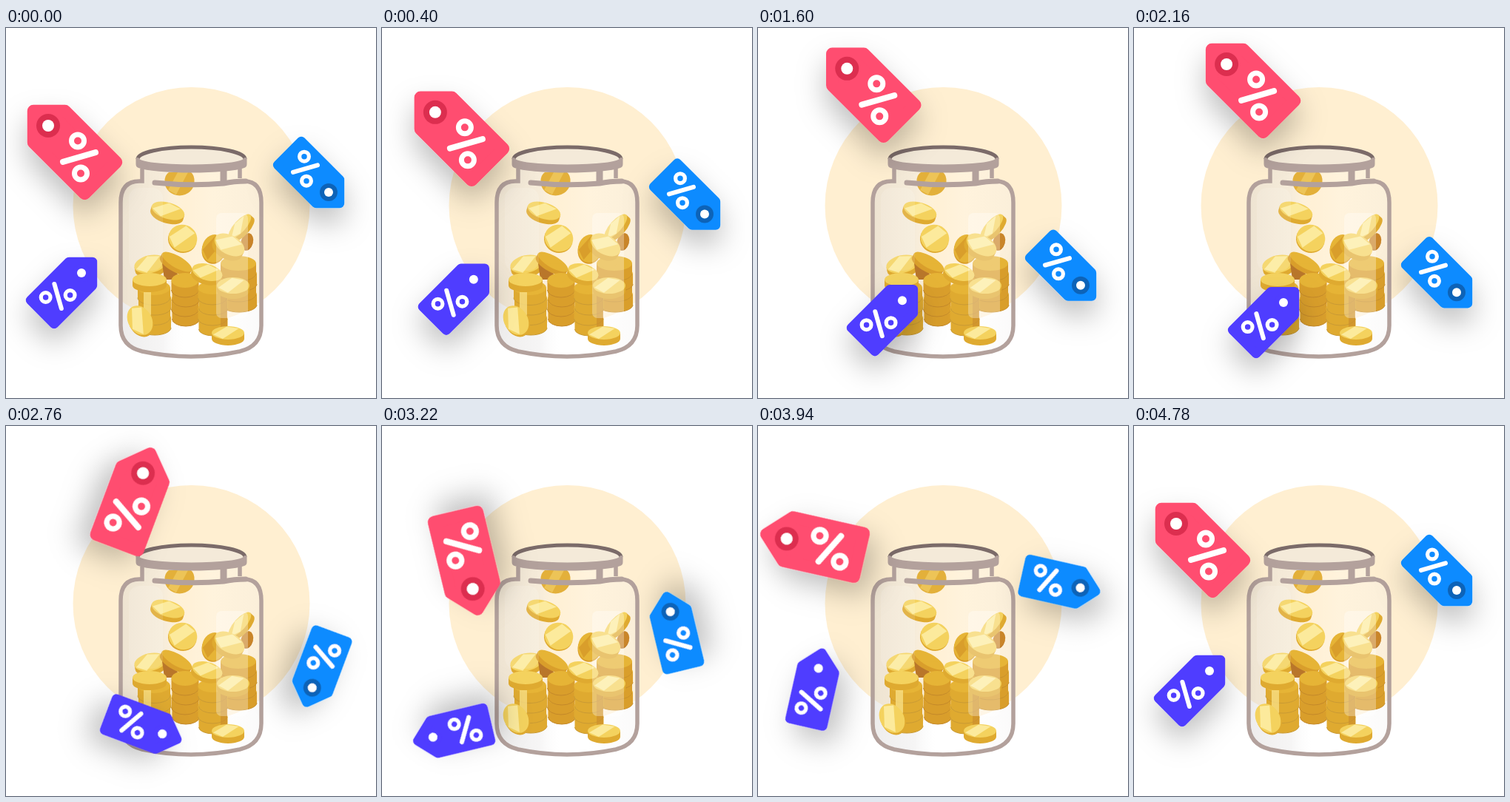
These frames come from a looping animation (500x500 px, 4800 ms). An HTML page:

```html
<!DOCTYPE html>
<html lang="en">
<head>
<meta charset="utf-8">
<title>Savings jar</title>
<style>
html, body { margin: 0; width: 100%; height: 100%; overflow: hidden; background: #fff; }
svg { display: block; width: 100vw; height: 100vh; }
</style>
</head>
<body>
<svg viewBox="0 0 500 500">
  <defs>
    <filter id="shadow" filterUnits="userSpaceOnUse" x="-150" y="-130" width="300" height="300">
      <feDropShadow dx="0" dy="20" stdDeviation="19" flood-color="#000" flood-opacity=".25"/>
    </filter>
    <linearGradient id="glass">
      <stop offset="0" stop-color="#d6d3d2" stop-opacity=".42"/>
      <stop offset=".3" stop-color="#e8e6e6" stop-opacity=".4"/>
      <stop offset=".45" stop-color="#fff" stop-opacity=".1"/>
      <stop offset=".65" stop-color="#fff" stop-opacity=".25"/>
      <stop offset="1" stop-color="#f1efee" stop-opacity=".3"/>
    </linearGradient>
    <g id="percent" fill="none" stroke="#fff">
      <circle cx="-2" cy="-22" r="8.5" stroke-width="7"/>
      <circle cx="2" cy="22" r="8.5" stroke-width="7"/>
      <path d="M-22 6.3 22-6.3" stroke-width="8" stroke-linecap="round"/>
    </g>
  </defs>

  <circle cx="250.5" cy="240" r="160" fill="#ffefd1"/>
  <path d="M184 190V207H180Q155 207 155 236V402Q155 430 184 437Q250 451 316 437Q345 430 345 402V236Q345 207 320 207H316V190Z" fill="url(#glass)"/>
  <ellipse cx="250.5" cy="175" rx="73" ry="14" fill="#f4ead9"/>
  <g id="coins"></g>
  <rect x="284" y="250" width="43" height="142" rx="7" fill="#fff" opacity=".3"/>
  <rect x="166" y="216" width="46" height="112" rx="14" fill="#fff" opacity=".12"/>

  <g fill="none" stroke="#b3a19c" stroke-width="5.500">
    <path d="M184 190V207H180Q155 207 155 236V402Q155 430 184 437Q250 451 316 437Q345 430 345 402V236Q345 207 322 207"/>
    <path d="M201 209Q250 214 294 210Q308 207 324 207" stroke-width="7" stroke-linecap="round"/>
    <path d="M294 190V208" stroke-width="9"/>
    <path d="M316 190V203"/>
  </g>
  <path d="M178 177A72.500 16 0 0 1 323 177" fill="none" stroke="#7b6b69" stroke-width="5"/>
  <path d="M175.500 176Q177 174 180 176A70.500 8.500 0 0 0 321 176Q324 174 325.500 176V184Q325.500 188 322 189A76 10 0 0 1 179 189Q175.500 188 175.500 184Z" fill="#b3a19c"/>
  <g id="tags"></g>
</svg>

<script>
const LOOP = 4800, HALF = LOOP / 2, LAG = 5;
const PALE = '#fcea9c', LIGHT = '#f4d25e', GOLD = '#e6b436', DEEP = '#d99e2b', RIM = '#dfaa30';

// A coin with thickness t; the stripe is a chord band across its face.
function coin(x, y, rx, ry, angle, t, face = LIGHT, edge = RIM, stripe = PALE) {
  const band = [110, 165, -95, -45].map(a => {
    const r = a * Math.PI / 180;
    return [rx * .94 * Math.cos(r), ry * .94 * Math.sin(r)];
  }).join(' ');
  return `<g transform="translate(${x} ${y}) rotate(${angle})">
    <path d="M${-rx} 0v${t}A${rx} ${ry} 0 0 0 ${rx} ${t}V0Z" fill="${edge}"/>
    <ellipse rx="${rx}" ry="${ry}" fill="${face}"/>
    <polygon points="${band}" fill="${stripe}"/></g>`;
}

function stack(x, y, rx, ry, count, step, face, edge, line) {
  let out = '';
  for (let i = count - 1; i >= 0; i--) {
    const cx = x + (i % 2 ? 1 : 0);
    out += coin(cx, y + i * step, rx, ry, 0, step, face, edge, face) +
      `<path d="M${cx - rx} ${y + (i + 1) * step}a${rx} ${ry} 0 0 0 ${2 * rx} 0" fill="none" stroke="${line}"/>`;
  }
  return out;
}

document.getElementById('coins').innerHTML = [
  '<path d="M220 195H250Q255 199 254.500 208A20 18.500 0 0 1 214.500 208Q214 199 220 195Z" fill="#e3b03a"/>',
  '<path d="M232 195H246L230 225L219 219Z" fill="#edc457"/>',
  coin(219, 247, 23, 11, 17, 6),
  coin(239, 284, 19.500, 18, 20, 2),
  coin(326, 288, 8, 11, 15, 2, '#c9852a', '#bd7826', '#c9852a'),
  coin(316, 268, 21, 8, -48, 6),
  coin(281, 298, 16, 19, 12, 2, GOLD, DEEP, DEEP),
  stack(314, 318, 24, 10, 4, 14, GOLD, DEEP, '#c98f2a'),
  coin(302, 293, 22, 13, 28, 7),
  coin(195, 319, 22, 12, -12, 6),
  '<path d="M211 318L226 322L236 340H214Z" fill="#b9762a"/>',
  coin(231, 316, 23, 8, 30, 6, GOLD, DEEP, GOLD),
  stack(242, 341, 18.500, 10, 4, 13, GOLD, DEEP, '#c4892a'),
  stack(200, 351, 22, 10, 4, 13.500, GOLD, RIM, '#c99a35'),
  coin(194, 340, 23, 9, 0, 8, LIGHT, RIM, LIGHT),
  '<path d="M186 357h10v44h-10z" fill="#fae28a" opacity=".75"/>',
  stack(279, 351, 19.500, 9, 4, 14, GOLD, RIM, '#c99a35'),
  '<path d="M290 357h9v55q-4 4-9 4z" fill="#c98a2c" opacity=".6"/>',
  coin(272, 330, 21, 11, 16, 6),
  coin(307, 348, 22, 11, 0, 7),
  coin(181, 395, 16, 21, -30, 3),
  coin(300, 412, 22, 9, 0, 8)
].join('');

// Rest centre, travel of the first half, size, quarter turns of the artwork.
const tags = [
  { x: 93, y: 168, dx: 68.5, dy: -83.5, size: 1, turn: 0, fill: '#ff4d6f', ring: '#dc2e50' },
  { x: 409, y: 195, dx: 0, dy: 136, size: .75, turn: 180, fill: '#118bff', ring: '#0b64b8' },
  { x: 75, y: 358, dx: 100.6, dy: 40.3, size: .75, turn: 90, fill: '#503cff', ring: '#503cff' }
];
const tagLayer = document.getElementById('tags');
tagLayer.innerHTML = tags.map(({ size, turn, fill, ring }) => `<g><g filter="url(#shadow)">
  <g transform="rotate(${turn}) scale(${size})">
    <path d="M-56-56H-13.300L56 13.300L13.300 56L-56-13.300Z" fill="${fill}" stroke="${fill}" stroke-width="16.500" stroke-linejoin="round"/>
    <circle cx="-36" cy="-36" r="16" fill="${ring}"/>
    <circle cx="-36" cy="-36" r="8" fill="#fff"/>
    <use href="#percent" x="6" y="6.500"/>
  </g></g></g>`).join('');

// cubic-bezier(.25, .1, .25, 1)
function ease(x) {
  let lo = 0, hi = 1, s;
  for (let i = 0; i < 24; i++) {
    s = (lo + hi) / 2;
    if (.75 * s * (1 - s) + s ** 3 < x) lo = s; else hi = s;
  }
  return .3 * s * (1 - s) ** 2 + 3 * s * s * (1 - s) + s ** 3;
}

function draw() {
  const t = (performance.now() + LOOP - LAG) % LOOP;
  const p = ease((t % HALF) / HALF);
  const returning = t >= HALF;
  const travel = returning ? 1 - p : p;
  const angle = returning ? 360 * p : 0;
  tags.forEach(({ x, y, dx, dy }, i) => tagLayer.children[i].setAttribute('transform',
    `translate(${x + dx * travel} ${y + dy * travel}) rotate(${angle} 0 20)`));
  requestAnimationFrame(draw);
}
draw();
</script>
</body>
</html>
```
